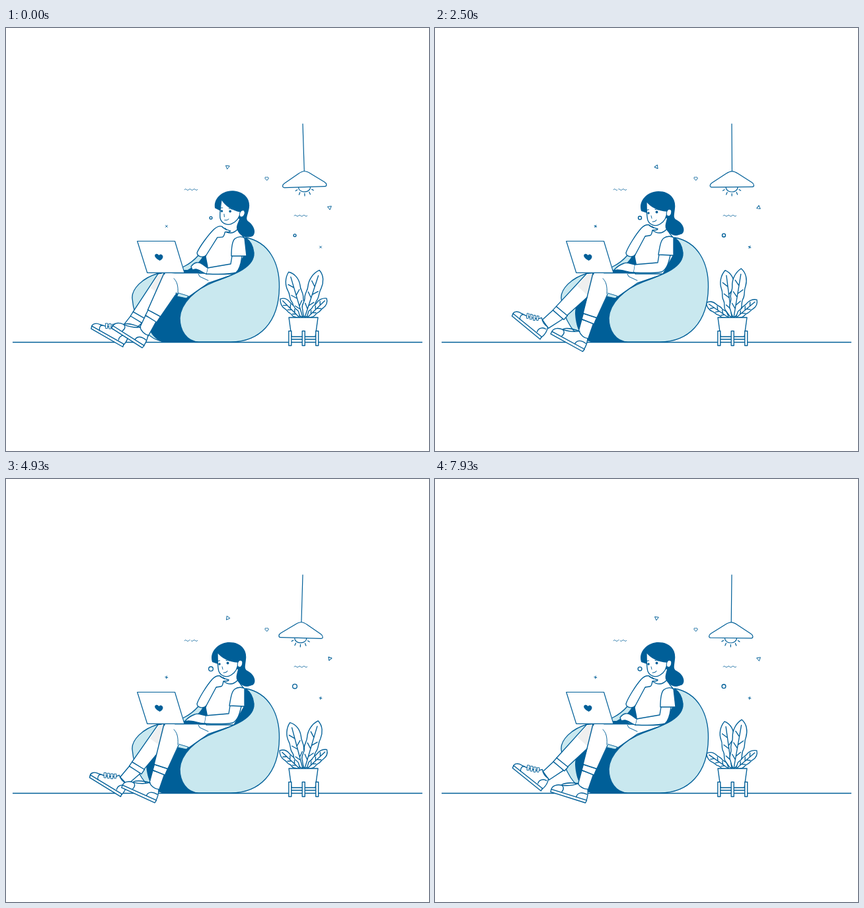
An HTML page for the animation above (8 s loop, 640 by 640 pixels).

```html
<!DOCTYPE html>
<html lang="en">
<head>
<meta charset="utf-8">
<title>Working from the beanbag</title>
<style>
html,body{margin:0;width:100%;height:100%;overflow:hidden;background:#fff}
svg{display:block;width:100vw;height:100vh}
path,line,rect,circle,ellipse{vector-effect:non-scaling-stroke}
.n{fill:none}
.d{fill:#005f98}
.l{fill:#c9e8ef}
.w{fill:#fff}
.t{stroke-width:.95}
.x{stroke:none}
</style>
</head>
<body>
<svg viewBox="0 0 640 640" fill="#fff" stroke="#005f98" stroke-width="1.35" stroke-linejoin="round" stroke-linecap="round">
  <defs>
    <g id="leaf">
      <path d="M0 0C-5 -3 -5 -8 -8 -12C-11 -17 -7 -21 -9 -27C-12 -33 -8 -38 -10 -45C-12 -54 -9 -65 -1 -72C8 -67 11 -57 10 -48C8 -40 12 -35 9 -28C7 -22 11 -17 8 -12C6 -8 5 -4 0 0Z"/>
      <path class="n" d="M0 0V-64M0 -13L-6 -20M0 -18L6 -25M0 -30L-7 -37M0 -35L7 -42M0 -47L-7 -54"/>
    </g>
    <path id="tri" class="n t" d="M0 -3L2.7 1.8H-2.7Z"/>
    <path id="cross" class="n t" d="M-2 0H2M0 -2V2"/>
    <path id="love" class="n t" d="M0 2.6L-2.6 -.3Q-2.6 -2.3 -.9 -2.2L0 -1.5L.9 -2.2Q2.6 -2.3 2.6 -.3Z"/>
    <path id="wave" class="n" stroke-width=".8" d="M0 .5q1.7 -2 3.3 0t3.3 0t3.3 0t3.3 0t3.3 0t3.3 0"/>
  </defs>

  <path d="M10 475.5H630" stroke-width="1.5" stroke-linecap="butt"/>

  <!-- floating marks -->
  <use href="#tri" id="tri1"/><use href="#tri" id="tri2"/>
  <use href="#cross" id="cross1"/><use href="#cross" id="cross2"/>
  <use href="#love" x="394.5" y="227.7"/>
  <use href="#wave" id="wave1" x="270" y="244"/>
  <use href="#wave" x="436" y="283.5"/>
  <circle class="n" id="dot1" cx="310" cy="287.3"/>
  <circle class="n" id="dot2" cx="437" cy="313.7"/>

  <!-- lamp -->
  <g id="lamp" stroke-width="1.2">
    <path d="M449 145V217"/>
    <path d="M439.500 241A9 7 0 0 0 457.500 241"/>
    <path d="M449 216.800C446 216.800 443 218.300 440 220.300L418.500 234C414.500 236.500 415 240.600 418 240.600H479.500C482.500 240.600 483 236.500 479 234L458 220.300C455 218.300 452 216.800 449 216.800Z"/>
    <path class="n" d="M437.500 244.500L435 246M441.500 248.500L440 252M448.500 250.500V254M455.500 248.500L457 252M459.500 244.500L462 246"/>
  </g>

  <!-- plant -->
  <use href="#leaf" id="leafA"/><use href="#leaf" id="leafB"/>
  <use href="#leaf" id="leafC"/><use href="#leaf" id="leafD"/>
  <path d="M428 438H472L468 467H432Z"/>
  <path d="M430 471H471" class="n"/>
  <path d="M427.800 458.500h4v22h-4ZM448.200 458.500h4v22h-4ZM468.700 458.500h4v22h-4Z"/>

  <!-- back of the beanbag -->
  <path class="l" d="M240 371C265 364 278 359 291 344L306 338V372Z"/>
  <path class="d x" d="M273 367C286 360 294 353 298 345L308 338V370Z"/>
  <path class="l" d="M231 371C206 378 190 395 191 409C193 435 209 475 245 475H292V371Z"/>
  <path class="d x" d="M236 385C222 395 212 414 212 432C213 450 218 468 236 475H294L282 400Z"/>
  <path class="d" d="M358 317C371 321 376 332 375 341C379 362 352 377 338 379L352 345Z"/>

  <!-- far leg -->
  <g id="farLeg">
    <path d="M180 425L162 441L171 454L193 440Z"/>
    <path d="M230 371L183 421L199 435L236 402L258 372Z"/>
    <path class="x" fill="#efefef" d="M231 372L241 371L235 402L229 403L215 390Z"/>
    <path d="M183 421L178 426.500L194.500 441L200 435Z"/>
    <path d="M117 433C118 428 125 427 130 431L138 435C145 438 154 441 161 438C162 445 167 450 170 452C169 460 164 465 160 468Z"/>
    <path d="M118 431.500L160.500 466.500L158.500 470.500L116 435Z"/>
    <path class="n" d="M128 440C128 435 131 432 134 433M154 459C156 453 163 452 167 455"/>
    <path d="M139 431l3 .5l-1.500 7.500l-2.500 -.5ZM144 432.500l3 .5l-1.500 7.500l-2.500 -.5ZM149 434l3 .5l-1.500 7.500l-2.500 -.5ZM154 435l3 .5l-1.500 6.500l-2.500 -.5Z" class="t"/>
  </g>

  <!-- near leg -->
  <path d="M239 371H350L306 386L276 407L258 402Z"/>
  <path class="l t" d="M261 401L276 405.500L273 409L259 406Z"/>
  <g id="nearLeg">
    <path d="M222 441L216 463L231 472L240 446Z"/>
    <g id="foot">
      <path d="M176 471C177 464 186 463 191 464C201 465 209 464 216 461C219 466 226 470 231 469C232 476 231 482 229 487Z"/>
      <path d="M176 470.500L230 486L228 490L175 474.500Z"/>
      <path class="n" d="M192 474C196 469 194 465 191 464M192 463C197 460 209 460 217 461M214 481C216 474 223 474 230 477"/>
    </g>
    <path class="x" d="M241 371L224 431L245 438L261 404L262 386L255 371Z"/>
    <path class="n" d="M239 371L224 432M245 438L261 403"/>
    <path d="M224.500 432L222 440.500L240.500 448L244.500 438.500Z"/>
  </g>
  <path class="x" d="M241 371.500H292L277 397L264 394C262 386 258 381 253 379L243 378Z"/>
  <path class="n t" d="M254 379C258 383 261 389 260 402M291 372L293 376L306 382"/>

  <!-- front of the beanbag -->
  <path class="l" d="M362 317C398 323 414 356 413.500 392C413 446 383 475 340 475H292C273 475 263 457 263 439C264 417 286 395 315 384C349 372 376 361 375 340C374 330 370 322 362 317Z"/>

  <!-- body -->
  <path class="x" d="M331 290L351 283L352 308L340 314L329 308Z"/>
  <path d="M329 306C319 311 306 328 302 346L305 361L303 372H345L361 343V318C357 314 353 308 351 304Q341 315 329 306Z"/>
  <path id="arm" class="w"/>
  <path id="sleeve" class="w"/>

  <g id="head">
    <path class="d x" d="M321 280L312 277C307 262 321 247 338 247C355 247 365 258 363 273C362 283 360 287 365 290C373 294 378 302 376 308C375 312 372 312 369 313C361 316 353 311 349 303C348 299 349 296 351 288Z"/>
    <path d="M320 262C320 273 320 284 322 291C325 298 333 301 340 297C347 293 351 287 351 277C339 276 327 271 320 262Z"/>
    <ellipse class="t" cx="354" cy="279.500" rx="3.600" ry="5.300" transform="rotate(16 354 279.500)"/>
    <circle class="d x" cx="323" cy="280" r="1.700"/>
    <circle class="d x" cx="335.500" cy="278.500" r="1.900"/>
    <path class="n t" d="M320 275.500l3.500 -.7M333 274.500q3 -1.500 5 .8M327 284l1 4M329 293q4 .5 6 -2.500"/>
  </g>
  <g id="hand">
    <path d="M289 340C292 331 304 312 312 303C316 299 320 297 324 298C327 301 330 302 337 304C336 307 332 305 329 306C328 310 328 314 325 314L318 315L303 343C299 348 289 346 289 340Z"/>
    <path class="n t" d="M324 299L331 303L329 300"/>
  </g>

  <!-- laptop -->
  <path d="M268 370H302" stroke-width="1.700"/>
  <path class="d x" d="M269 366L289 366L294 370H270Z"/>
  <path stroke-width="1.200" d="M198.700 322.500H255.500L270 370.300H213.700Z"/>
  <path class="d x" d="M232.500 352C227 349 224 345.500 225.500 343C227.500 340.500 230.500 342 231.500 344C233.500 341.500 237 342.500 237.500 346C237.500 349 235 351 232.500 352Z"/>
  <path id="fingers" class="w"/>
</svg>
<script>
const LOOP = 8000, SWING = 5700, TAU = Math.PI * 2;
const $ = id => document.getElementById(id);
const set = (id, name, value) => $(id).setAttribute(name, value);
const turn = (id, deg, x, y, dx = 0, dy = 0) =>
  set(id, 'transform', `translate(${dx} ${dy}) rotate(${deg} ${x} ${y})`);
const place = (id, x, y, deg, sx = 1, sy = sx) =>
  set(id, 'transform', `translate(${x} ${y}) rotate(${deg}) scale(${sx} ${sy})`);

// 0 to 1 between two times, eased at both ends
const ease = (t, from, to) => {
  const k = Math.min(1, Math.max(0, (t - from) / (to - from)));
  return (1 - Math.cos(k * Math.PI)) / 2;
};

// blend two paths that share the same commands
const blend = (a, b, k) => {
  const ends = b.match(/\d+/g);
  let i = 0;
  return a.replace(/\d+/g, n => (+n + (ends[i++] - n) * k).toFixed(2));
};

const poses = {
  arm: [
    'M339 343L337 355L302 358L300 370C320 371 332 371 343 369C352 364 354 352 356 344',
    'M342 345L340 357L305 363L303 372C323 373 338 373 348 370C355 364 356 352 357 345'],
  sleeve: [
    'M338 343C340 332 341 322 346 318C351 314 358 315 361 317L361 344Z',
    'M341 345C341 333 342 323 346 319C351 315 358 315 361 318L364 345Z'],
  fingers: [
    'M302 358C296 357 290 354 286 356C280 358 276 361 273 364L270 367L276 366C284 366 290 369 300 370',
    'M305 363C299 359 295 354 288 355C284 356 282 358 280 361L282 366L287 365C292 365 298 371 303 372']
};

function draw(t) {
  const sway = Math.cos(TAU * t / SWING);
  const slow = Math.cos(TAU * t / (2 * SWING));
  const lean = 1 - ease(t, 0, 1700);
  const tap = ((1 + Math.cos(TAU * (t - 3270) / 399)) / 2) ** 2;
  const type = 1 - ease(t, 500, 1700) + ease(t, 6000, 6700);
  const spin = t * 0.03;

  turn('lamp', -1.82 * slow, 449, 145);
  turn('farLeg', -5 * (1 + sway), 236, 372);
  turn('nearLeg', 10 * lean, 250, 375);
  turn('foot', 14 * tap, 228, 469);
  turn('head', 8 * lean, 340, 285, 2.7 * lean, -0.6 * lean);
  turn('hand', 4 * lean, 292, 342);

  place('leafA', 449, 438, -11.7 - 4.8 * sway);
  place('leafB', 452, 438, 13.5 + 4.5 * sway, 1, 1.04);
  place('leafC', 444, 438, -50.5 + 5.5 * sway, 0.62, 0.56);
  place('leafD', 456, 438, 48 - 2 * sway, 0.62, 0.57);

  place('tri1', 335.3, 210.3, 68 + spin);
  place('tri2', 489.8, 271.8, 52 + spin);
  place('cross1', 242.8, 300, 45 + spin);
  place('cross2', 476, 331.5, 45 + spin);
  const r = 2.65 - 0.75 * slow;
  set('dot1', 'r', r);
  set('dot2', 'r', r);
  const gap = 1.5 + 8 * ease(t, 1500, 3200);
  set('wave1', 'stroke-dasharray', t < 1300 ? 'none' : `${gap} 2.4 40`);

  for (const id in poses) set(id, 'd', blend(...poses[id], type));
}

function tick() {
  draw(performance.now() % LOOP);
  requestAnimationFrame(tick);
}
tick();
</script>
</body>
</html>
```
